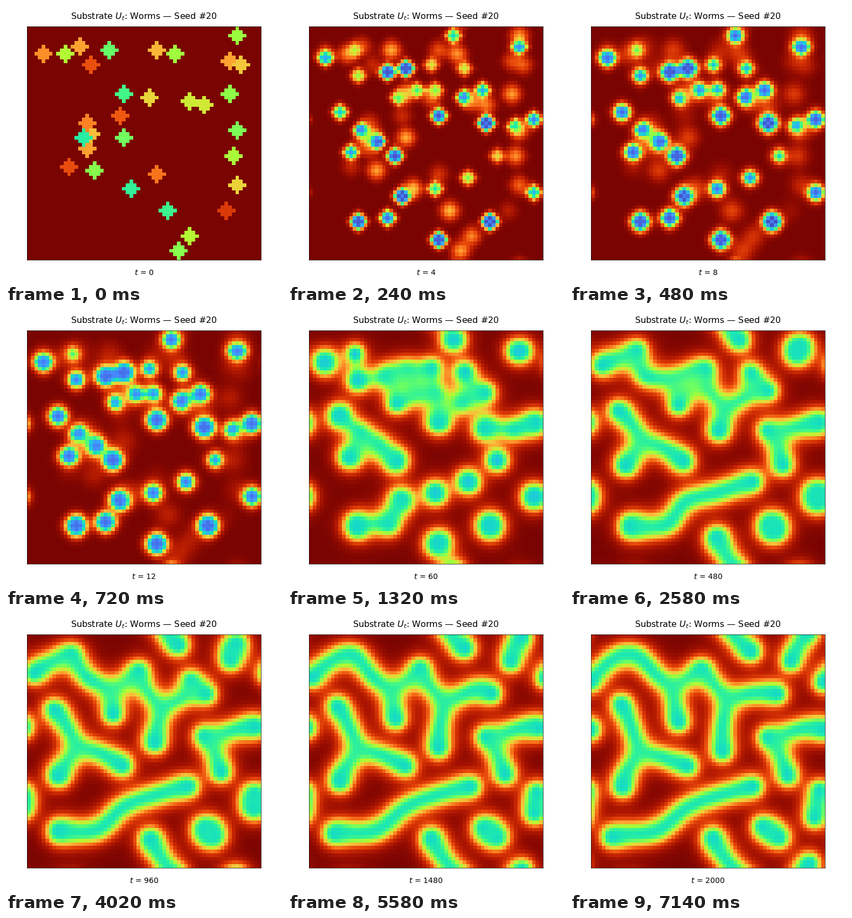
Write a matplotlib script that moves like this. It is 512 px wide and 512 px high and loops after 8 s.

```python
import numpy as np
import matplotlib.pyplot as plt
from matplotlib.animation import FuncAnimation

SIZE, DPI, GRID = 512, 64, 64
FEED, KILL = 0.078, 0.061
DIFF_U, DIFF_V = 0.16, 0.08
TICK, HOLD, SHOTS, LOOP = 20, 60, 120, 8000  # ms, ms, pictures, ms

# (column, row) where worms start, from the weakest seed to the strongest
WORM_STARTS = [
    (51, 35), (33, 10), (42, 11), (12, 6), (13, 13), (43, 41), (34, 17), (29, 17),
    (24, 19), (34, 44), (39, 2), (8, 23), (61, 45), (47, 17), (11, 34), (56, 27),
    (61, 25), (57, 5), (21, 52), (42, 19), (4, 8), (35, 24), (14, 28), (23, 35),
    (21, 12), (13, 53), (35, 58), (26, 11), (25, 46), (48, 26), (18, 31), (49, 53),
]


def seeded(base, centres, values):
    """A flat field with a small disc of each value at each centre."""
    field = np.full((GRID, GRID), base)
    rows, cols = np.indices(field.shape)
    for (col, row), value in zip(centres, values):
        field[(cols - col) ** 2 + (rows - row) ** 2 <= 4] = value
    return field


def laplacian(a):
    return (np.roll(a, 1, 0) + np.roll(a, -1, 0)
            + np.roll(a, 1, 1) + np.roll(a, -1, 1) - 4 * a)


def step(u, v):
    reaction = u * v * v
    return (u + DIFF_U * laplacian(u) - reaction + FEED * (1 - u),
            v + DIFF_V * laplacian(v) + reaction - (FEED + KILL) * v)


def time_of(shot):
    """Single steps at first, then twenty at a time."""
    return shot if shot <= 20 else 20 * (shot - 19)


def simulate():
    rng = np.random.default_rng(20)
    count = len(WORM_STARTS)
    u = seeded(1.0, rng.integers(2, 62, (count, 2)), rng.uniform(0.34, 0.86, count))
    v = seeded(0.0, WORM_STARTS, np.linspace(0.29, 0.55, count))
    now, states = 0, []
    for shot in range(SHOTS):
        while now < time_of(shot):
            u, v = step(u, v)
            now += 1
        states.append(u)
    return states


states = simulate()

plt.rcParams["font.family"] = "DejaVu Sans"
fig = plt.figure(figsize=(SIZE / DPI, SIZE / DPI), dpi=DPI, facecolor="white")
ax = fig.add_axes([39 / SIZE, 41 / SIZE, 434 / SIZE, 433 / SIZE])
ax.set(xticks=[], yticks=[])
image = ax.imshow(states[0], cmap="turbo", vmin=0, vmax=1,
                  interpolation="nearest", aspect="auto")
fig.text(0.5, 488 / SIZE, "Substrate $U_t$: Worms — Seed #20",
         ha="center", va="baseline", fontsize=18)
clock = fig.text(0.5, 13 / SIZE, "", ha="center", va="baseline", fontsize=16)


def update(frame):
    shot = min(frame * TICK // HOLD, SHOTS - 1)
    image.set_data(states[shot])
    clock.set_text(f"$t$ = {time_of(shot)}")
    return image, clock


anim = FuncAnimation(fig, update, frames=LOOP // TICK, interval=TICK,
                     repeat=True, repeat_delay=0)
plt.show()
```
